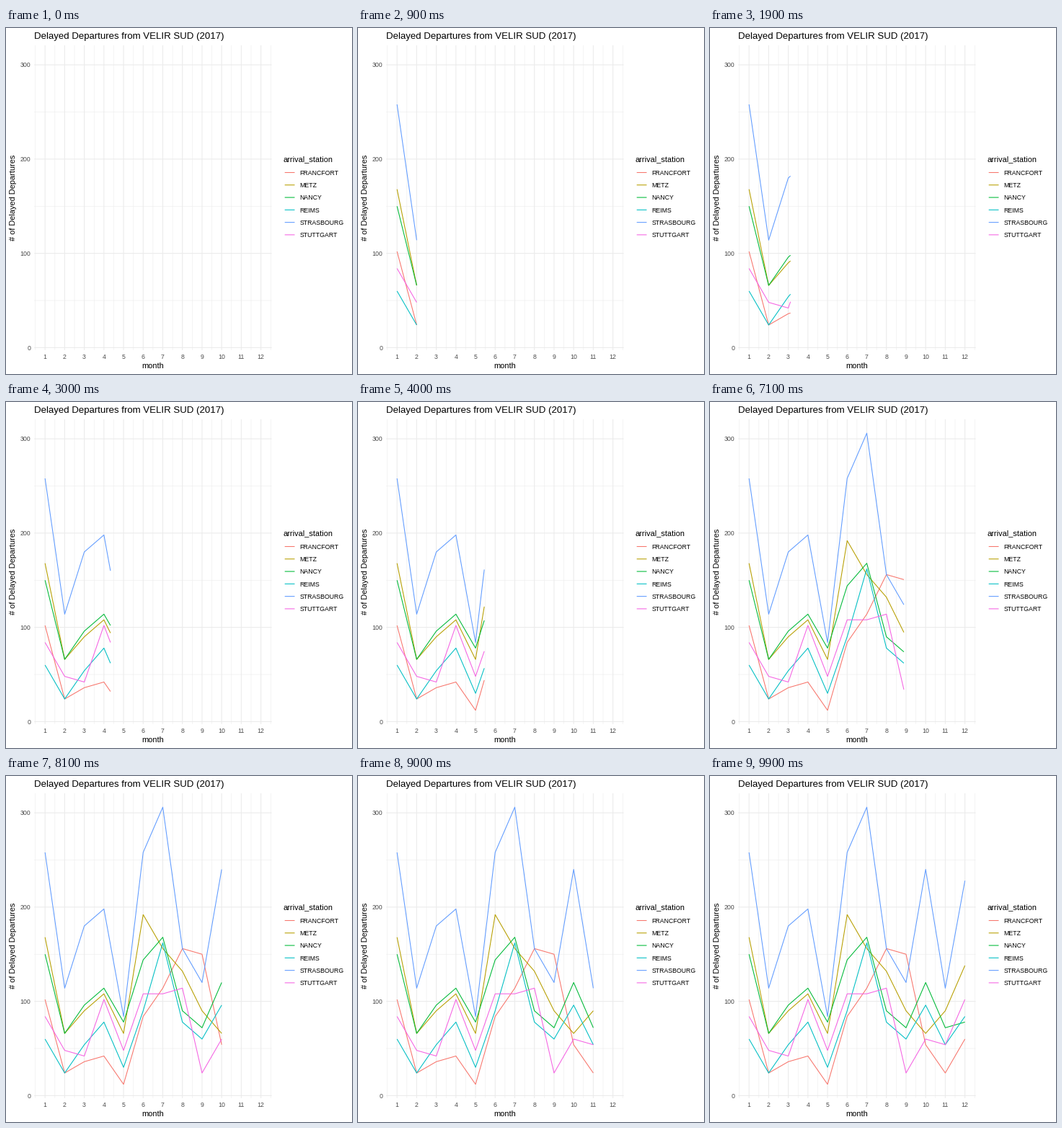
Write a matplotlib script that moves like this. It is 480 by 480 pixels and loops after 10000 ms.

```python
import numpy as np
import matplotlib.pyplot as plt
from matplotlib.animation import FuncAnimation

plt.rcParams["font.family"] = "Liberation Sans"

SIZE, DPI = 480, 72          # at 72 dpi one point is one pixel
FRAMES, INTERVAL = 100, 100
LEFT, RIGHT, TOP, BOTTOM = 39.2, 368.6, 24.0, 446.9
GRID, TICK = "#EBEBEB", "#4D4D4D"
LINE_W = 1.07

MONTHS = np.arange(1, 13)
SERIES = {
    "FRANCFORT": ("#F8766D", [102, 24, 36, 42, 12, 84, 114, 156, 150, 54, 24, 60]),
    "METZ": ("#B79F00", [168, 66, 90, 108, 66, 192, 156, 132, 90, 66, 90, 138]),
    "NANCY": ("#00BA38", [150, 66, 96, 114, 78, 144, 168, 90, 72, 120, 72, 78]),
    "REIMS": ("#00BFC4", [60, 24, 54, 78, 30, 90, 162, 78, 60, 96, 54, 84]),
    "STRASBOURG": ("#619CFF", [258, 114, 180, 198, 84, 258, 306, 156, 120, 240, 114, 228]),
    "STUTTGART": ("#F564E3", [84, 48, 42, 102, 48, 108, 108, 114, 24, 60, 54, 102]),
}


def px(month):
    return LEFT + (np.asarray(month) - 0.45) * (RIGHT - LEFT) / 12.1


def py(count):
    return 443.4 - np.asarray(count) * 1.3077


fig = plt.figure(figsize=(SIZE / DPI, SIZE / DPI), dpi=DPI, facecolor="white")
ax = fig.add_axes([0, 0, 1, 1])
ax.set_xlim(0, SIZE)
ax.set_ylim(SIZE, 0)
ax.axis("off")


def stroke(xs, ys, color, width=LINE_W, z=2):
    line, = ax.plot(xs, ys, color=color, lw=width, zorder=z, snap=False,
                    solid_capstyle="butt", solid_joinstyle="round")
    return line


def label(x, y, text, size, color="black", ha="left", **kw):
    ax.text(x, y, text, fontsize=size, color=color, ha=ha, va="baseline", **kw)


def vline(month, width):
    stroke([px(month)] * 2, [TOP, BOTTOM], GRID, width, 1)


def hline(count, width):
    stroke([LEFT, RIGHT], [py(count)] * 2, GRID, width, 1)


# grid and axes
for m in np.arange(0.5, 13):
    vline(m, LINE_W / 2)
for c in (50, 150, 250):
    hline(c, LINE_W / 2)
for m in MONTHS:
    vline(m, LINE_W)
    label(px(m), 459, str(m), 8.8, TICK, "center")
for c in (0, 100, 200, 300):
    hline(c, LINE_W)
    label(34.2, py(c) + 3.3, str(c), 8.8, TICK, "right")

label(LEFT, 15, "Delayed Departures from VELIR SUD (2017)", 13.2)
label((LEFT + RIGHT) / 2, 472, "month", 11, ha="center")
ax.text(13, (TOP + BOTTOM) / 2, "# of Delayed Departures", fontsize=11,
        rotation=90, rotation_mode="anchor", ha="center", va="baseline")

# legend
label(384.8, 185, "arrival_station", 11)
for i, (name, (color, _)) in enumerate(SERIES.items()):
    y = 200.5 + 17.28 * i
    stroke([386.7, 400.5], [y, y], color)
    label(407.7, y + 3.3, name, 8.8)

curves = [(stroke([], [], color, z=3), np.array(counts))
          for color, counts in SERIES.values()]


def update(frame):
    now = 1 + 11 * frame / (FRAMES - 1)
    xs = np.append(MONTHS[MONTHS < now], now)
    for line, counts in curves:
        line.set_data(px(xs), py(np.interp(xs, MONTHS, counts)))
    return [line for line, _ in curves]


anim = FuncAnimation(fig, update, frames=FRAMES, interval=INTERVAL,
                     repeat=True, repeat_delay=0, blit=False)
plt.show()
```
